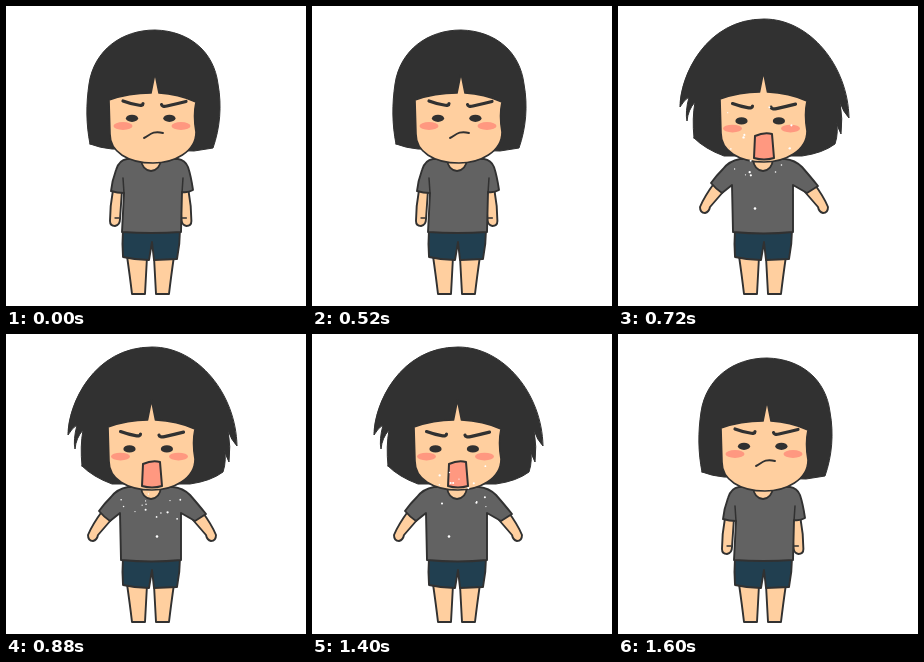
Recreate the animation shown at these times as an HTML page with a canvas. Size 300 by 300 pixels, loop 2.8 s.

```html
<!DOCTYPE html>
<html lang="en">
<head>
<meta charset="utf-8">
<title>Angry kid</title>
<style>
html, body { margin: 0; width: 100%; height: 100%; overflow: hidden; background: #fff; }
canvas { display: block; width: 300px; height: 300px; }
</style>
</head>
<body>
<canvas id="stage" width="300" height="300"></canvas>
<script>
const ctx = document.getElementById('stage').getContext('2d');
const LOOP = 2800, SHOUT = 560, LAST_BURST = 1400, CALM = 1600, BURST = 160;
const INK = '#313131', SKIN = '#ffcf9f', SHIRT = '#626262', SHORTS = '#213f50', PINK = '#ff9880';

function shape(d, fill, line = 1.9) {
  const p = new Path2D(d);
  if (fill) { ctx.fillStyle = fill; ctx.fill(p); }
  ctx.lineWidth = line;
  ctx.stroke(p);
}

function oval(x, y, rx, ry, fill) {
  ctx.fillStyle = fill;
  ctx.beginPath();
  ctx.ellipse(x, y, rx, ry, 0, 0, Math.PI * 2);
  ctx.fill();
}

function shifted(dx, dy, paint) {
  ctx.save();
  ctx.translate(dx, dy);
  paint();
  ctx.restore();
}

// Paints once as given and once reflected about a vertical axis
function mirrored(axis, paint) {
  paint();
  ctx.save();
  ctx.translate(2 * axis, 0);
  ctx.scale(-1, 1);
  paint();
  ctx.restore();
}

function drawLegs() {
  mirrored(144.5, () => shape('M121 250 Q124 271 126 288 L139 288 L141 251Z', SKIN));
  shape('M117 223 Q116 238 117 251 Q130 254 143 254 L146 236 L148 254 L171 253 Q174 238 174 224Z', SHORTS);
}

function drawCollar() {
  shape('M135 153 Q136 164 145 165 Q154 164 155 153Z', SKIN);
}

function drawHead(notch) {
  shape(`M103 94 Q123 87 ${notch - 4} 87 L${notch} 67 L${notch + 4} 87 Q172 88 190 96
    Q187 110 190 126 C190 146 168 157 147 157 C122 157 104 146 104 128Z`, SKIN, 1.6);
}

function drawFeatures() {
  mirrored(146, () => oval(117, 120, 9.5, 3.9, PINK));
  mirrored(144.7, () => oval(126, 112.3, 6.1, 3.6, INK));
  shape('M117 95 Q125 98 132 99 Q137 100 137 97.5 M180 95.5 Q170 98 161 100 Q156 101 155.5 98.5', null, 3.2);
}

function drawCalm() {
  drawLegs();
  mirrored(144.7, () => {
    shape('M107 184 Q104 200 104 215 Q104 220 109 220 Q114 219 114 213 L116 184Z', SKIN);
    shape('M109 212 L113 212', null, 1.3);
  });
  shape('M121 153 Q113 154 110 164 Q106 175 105 185 Q111 187 118 187 L116 226 Q146 228 175 226 L176 186 Q182 187 187 184 Q185 170 182 161 Q179 154 172 153Z', SHIRT);
  mirrored(147, () => shape('M117 172 L118 187', null, 1.5));
  drawCollar();
  shape('M84 138 C80 118 80 98 83 78 C88 44 116 24 149 24 C184 25 208 46 212 78 C216 100 214 122 207 142 L188 145 L106 143 Q94 142 84 138Z', INK, 1);
  drawHead(149);
  drawFeatures();
  shape('M138 132 C143 130 146 124 157 127');
}

function drawShout() {
  drawLegs();
  mirrored(146, () => shape('M97 176 Q86 191 82 201 Q82 207 87 207 Q91 206 92 201 L105 186Z', SKIN));
  shape('M122 153 Q111 155 105 163 Q98 170 93 177 Q98 183 104 187 L114 179 L115 226 Q146 229 175 226 L175 179 L189 187 L200 180 Q191 169 184 161 Q177 154 167 153Z', SHIRT);
  drawCollar();
  shape(`M76 132 Q74 112 77 96 Q70 104 69 115 Q67 106 71 91 Q66 94 62 101 C62 70 88 13 146 13
    C192 13 230 60 231 112 Q225 106 222 96 Q225 113 223 128 Q219 121 218 112
    Q221 126 217 138 Q205 147 184 150 L106 150 Q87 143 76 132Z`, INK, 1);
  shifted(-1, -1, () => drawHead(146.5));
  shifted(-2.5, 2.6, drawFeatures);
  shape('M137 130 Q146 126 154 128 L156 152 Q146 155 136 152Z', PINK, 2);
}

function randomFrom(seed) {
  return () => (seed = seed * 16807 % 2147483647) / 2147483647;
}

// Scatters small drops between two heights, with one large drop below
function drawSpray(seed, top, bottom, bigX) {
  const rand = randomFrom(seed);
  rand();
  for (let i = 0; i < 14; i++) {
    const r = 0.6 + 0.6 * rand();
    oval(108 + 68 * rand(), top + (bottom - top) * rand(), r, r, '#fff');
  }
  oval(bigX, 202.5, 1.3, 1.3, '#fff');
}

function drawBurst(t) {
  if (t >= LAST_BURST) drawSpray(4021, 131, 176, 137);
  else if (Math.floor((t - SHOUT) / BURST) % 2) drawSpray(7919, 97, 180, 137);
  else drawSpray(5303, 160, 186, 151);
}

function draw(t) {
  ctx.fillStyle = '#fff';
  ctx.fillRect(0, 0, 300, 300);
  ctx.strokeStyle = INK;
  ctx.lineCap = ctx.lineJoin = 'round';
  if (t < SHOUT || t >= CALM) return drawCalm();
  drawShout();
  drawBurst(t);
}

const start = performance.now();
function tick() {
  draw((performance.now() - start) % LOOP);
  requestAnimationFrame(tick);
}
tick();
</script>
</body>
</html>
```
